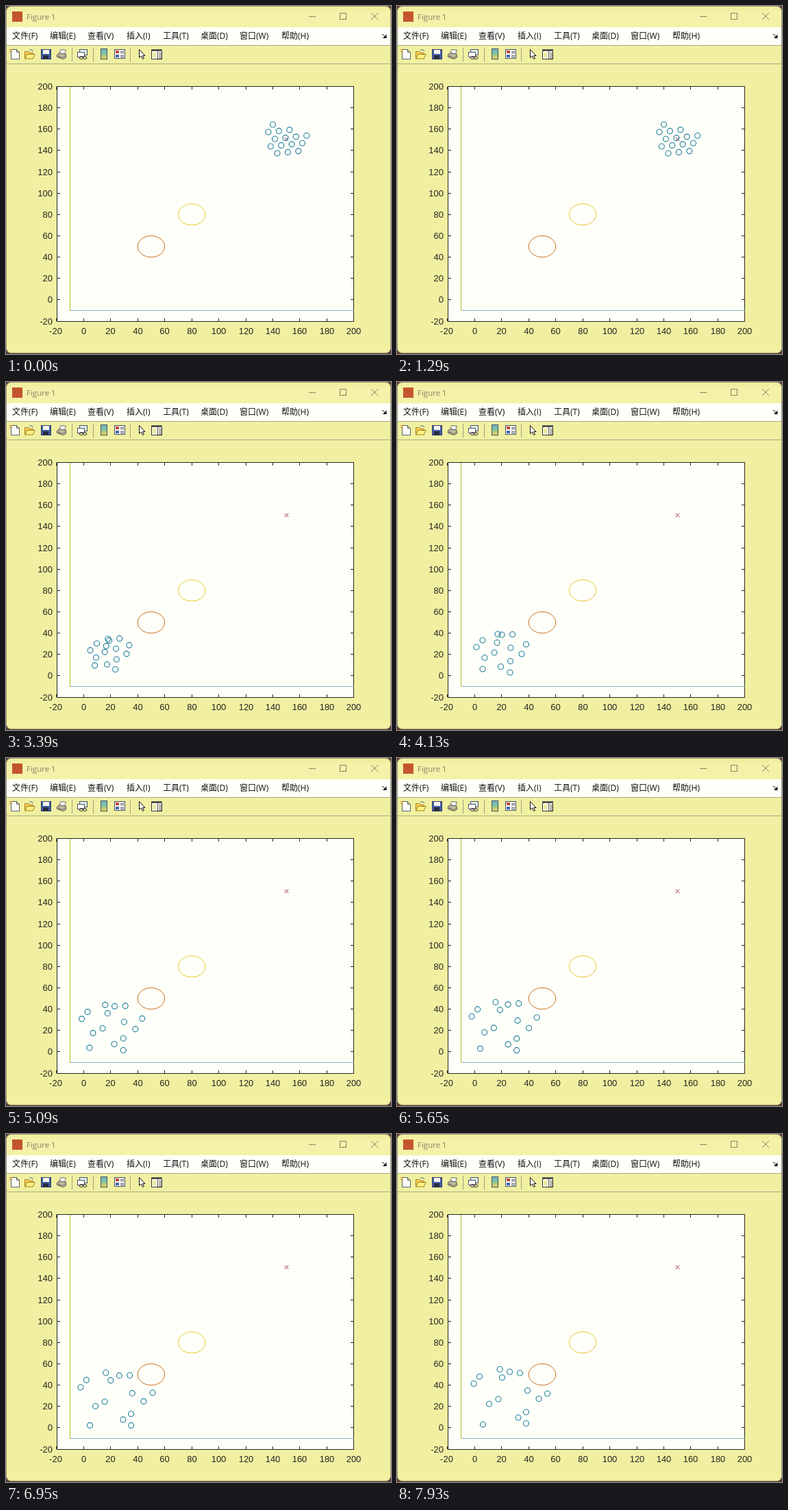
An HTML page with a canvas that plays this animation: 562x508 px, repeating every 8 s.

```html
<!DOCTYPE html>
<html lang="zh">
<head>
<meta charset="utf-8">
<title>Figure 1</title>
<style>
html, body { margin: 0; width: 100%; height: 100%; overflow: hidden; background: #5a3c32; }
canvas { display: block; }
</style>
</head>
<body>
<canvas id="stage" width="562" height="508"></canvas>
<script>
const ctx = document.getElementById('stage').getContext('2d');
const LOOP = 8000;
const RESTART = 2545;
const PANEL = '#f1f0a2', PAPER = '#fffffa', GRAY = '#85836a', INK = '#262620';
const UI = '"Open Sans", "Noto Sans CJK SC", "Noto Sans CJK", sans-serif';

// Swarm at rest around the goal: rows of a tilted lattice.
const restRow = (x, y, n) => Array.from({ length: n }, (_, i) => [x + 15.4 * i, y - 1.6 * i]);
const resting = [
  ...restRow(389.5, 173, 1), ...restRow(383, 184, 3), ...restRow(392.5, 194, 4),
  ...restRow(386.3, 205, 4), ...restRow(396, 215, 3)
];

// Each agent's path as x, y waypoints at these times.
const times = [2550, 4130, 6110, 7930];
const paths = [
  [134, 397, 116, 387, 108.5, 374.5, 112, 364.5],
  [144, 387, 125, 377, 117, 364, 120.5, 354],
  [151, 384, 147, 368, 144, 353.5, 150, 343.5],
  [149, 389, 153, 369, 164, 357.5, 164.5, 347],
  [163.5, 382, 168.5, 368.5, 179.5, 356, 179.5, 349],
  [148, 390, 146, 380.5, 151.5, 364.5, 153.5, 355.5],
  [148, 392, 142, 395, 142, 393, 148, 387],
  [138, 401, 128, 402.5, 128.5, 399.5, 134.5, 394],
  [137, 406, 125, 419, 121.5, 425, 125.5, 424],
  [144, 407, 151.5, 415.5, 165.5, 418, 177, 414],
  [153, 412, 165, 424, 177.5, 426.5, 188.5, 422.5],
  [157, 401, 165.5, 407.5, 177.5, 409.5, 188.5, 406],
  [154, 390, 166, 388, 179, 381.5, 190.5, 374.5],
  [168.5, 395.5, 182, 397, 195.5, 393, 207, 386.5],
  [169, 385, 188.5, 383, 208, 378, 219.5, 379]
];

// Cubic Hermite curve through unevenly timed values.
function curve(v, t) {
  const last = times.length - 1;
  const slope = i => (v[i + 1] - v[i]) / (times[i + 1] - times[i]);
  const tangent = i => {
    if (i === 0) return 2 * slope(0) - tangent(1);
    if (i === last) return 2 * slope(last - 1) - tangent(last - 1);
    const a = times[i] - times[i - 1], b = times[i + 1] - times[i];
    return (slope(i - 1) * b + slope(i) * a) / (a + b);
  };
  let i = 0;
  while (i < last - 1 && t > times[i + 1]) i++;
  const h = times[i + 1] - times[i];
  const u = Math.max(0, (t - times[i]) / h);
  const w = 1 - u;
  return v[i] * (1 + 2 * u) * w * w + v[i + 1] * u * u * (3 - 2 * u)
    + h * u * w * (tangent(i) * w - tangent(i + 1) * u);
}

const agentAt = (path, t) => [0, 1].map(axis => curve(path.filter((_, i) => i % 2 === axis), t));

function rect(x, y, w, h, fill, stroke) {
  if (fill) { ctx.fillStyle = fill; ctx.fillRect(x, y, w, h); }
  if (stroke) { ctx.strokeStyle = stroke; ctx.strokeRect(x + .5, y + .5, w - 1, h - 1); }
}

function shape(d, stroke, fill) {
  const path = new Path2D(d);
  if (fill) { ctx.fillStyle = fill; ctx.fill(path); }
  if (stroke) { ctx.strokeStyle = stroke; ctx.stroke(path); }
}

function oval(x, y, rx, ry, color) {
  ctx.beginPath();
  ctx.ellipse(x, y, rx, ry, 0, 0, 2 * Math.PI);
  ctx.strokeStyle = color;
  ctx.stroke();
}

function cross(x, y, r, color) {
  shape(`M${x - r} ${y - r}l${2 * r} ${2 * r}m0 ${-2 * r}l${-2 * r} ${2 * r}`, color);
}

function text(s, x, y, font, color, align = 'left') {
  ctx.font = font;
  ctx.fillStyle = color;
  ctx.textAlign = align;
  ctx.fillText(s, x, y);
}

function drawWindow() {
  rect(0, 0, 562, 508, '#5a3c32');
  ctx.beginPath();
  ctx.roundRect(.5, .5, 561, 506, 7);
  ctx.fillStyle = PANEL;
  ctx.fill();
  ctx.strokeStyle = '#a09a70';
  ctx.stroke();
  rect(1, 8, 560, 23, '#f4f1a8');
  rect(9, 8, 15, 15, '#c4562c');
  text('Figure 1', 30, 20, '11.5px ' + UI, GRAY);
  rect(442, 15, 10, 1, GRAY);
  rect(487, 10, 10, 10, null, GRAY);
  cross(538, 15, 5, GRAY);

  rect(1, 31, 560, 26, PAPER);
  const menus = { 9: '文件(F)', 64: '编辑(E)', 119: '查看(V)', 176: '插入(I)',
    229: '工具(T)', 284: '桌面(D)', 341: '窗口(W)', 402: '帮助(H)' };
  for (const x in menus) text(menus[x], +x, 48, '12px ' + UI, '#111');
  shape('M549 41l5 4', '#111');
  shape('M555.5 41.5v5.5h-5.5z', null, '#111');
  for (const y of [57, 84]) rect(1, y, 560, 1, '#a8a88a');
}

function drawToolbar() {
  for (const x of [96, 127, 181]) rect(x, 61, 1, 20, '#a0a080');
  // new
  shape('M7.5 63.5h8l4 4v10h-12zM15.5 63.5v4h4', '#55606c', PAPER);
  cross(7, 65, 2.5, '#e08a28');
  // open
  shape('M27.5 76.5v-10h5l2 2h5v8z', '#a08020', '#f0d050');
  shape('M27.5 77l3.5-6.5h11.5l-3.5 6.5z', '#a08020', '#fff080');
  shape('M34 65l3-1.5 3 2.5', '#4a6080');
  // save
  rect(51, 63, 15, 15, '#4560a0', '#303c68');
  rect(54, 64, 9, 6, '#f4f4ee');
  rect(54, 72, 8, 5, '#252c40');
  // print
  shape('M77.5 70l2.5-6.5 7.5 1-2.5 6.5z', '#666', PAPER);
  shape('M74.5 71l3.5-2.5 9.5 2v4.5l-4 2.5-9-3zM76 73l7 2 3-2', '#555', '#b8b698');
  // link
  rect(107, 63, 12, 9, '#e8eee8', '#405070');
  rect(104, 67, 11, 8, PAPER, '#405070');
  for (const x of [110, 115]) oval(x, 75.5, 3, 2, '#333');
  // colour bar
  const bar = ctx.createLinearGradient(0, 63, 0, 77);
  ['#70b8c8', '#80c498', '#e8d858'].forEach((c, i) => bar.addColorStop(i / 2, c));
  rect(138, 62, 10, 16, bar, '#44505c');
  // legend
  rect(158, 63, 16, 14, PAPER, '#3c4860');
  ['#c04838', '#4868b0'].forEach((c, i) => {
    rect(160, 65 + 6 * i, 5, 4, c);
    rect(167, 66 + 6 * i, 5, 1, '#555');
    rect(167, 68 + 6 * i, 5, 1, '#555');
  });
  // pointer
  shape('M194.5 63.5v12l3-2.5 2 4.5 2-1-2-4h3.5z', '#111', '#fff');
  // inspector
  rect(212, 63, 16, 15, '#fffff0', '#333');
  rect(212, 63, 16, 3, '#555');
  rect(221, 66, 1, 11, '#555');
  for (let y = 68; y < 77; y += 2) rect(223, y, 4, 1, '#777');
  rect(214, 68, 5, 7, '#ecea98');
}

const px = x => 113.3 + x * 1.973;
const py = y => 428.9 - y * 1.557;

function drawAxes() {
  const font = '13px "Liberation Sans", Arial, sans-serif';
  rect(74, 117, 434, 344, PAPER, INK);
  for (let v = -20; v <= 200; v += 20) {
    const x = Math.floor(px(v)), y = Math.floor(py(v));
    for (const edge of [118, 456]) rect(x, edge, 1, 4, INK);
    for (const edge of [75, 503]) rect(edge, y, 4, 1, INK);
    text(v, x + .5 - (v < 0 ? 1 : 0), 479, font, INK, 'center');
    text(v, 68, y + 5, font, INK, 'right');
  }
  rect(93, 118, 1, 327, '#a4c522');
  rect(94, 444, 414, 1, '#86b9bd');
  oval(px(50), py(50), 19.7, 15.6, '#c8721c');
  oval(px(80), py(80), 19.7, 15.6, '#e6c822');
  cross(409.5, 194.5, 2.7, '#902850');
}

function frame(now) {
  const t = now % LOOP;
  ctx.lineWidth = 1;
  drawWindow();
  drawToolbar();
  drawAxes();
  const agents = t < RESTART ? resting : paths.map(p => agentAt(p, t));
  ctx.lineWidth = 1.15;
  for (const [x, y] of agents) oval(x, y, 4, 4, '#24809c');
  requestAnimationFrame(frame);
}
requestAnimationFrame(frame);
</script>
</body>
</html>
```
